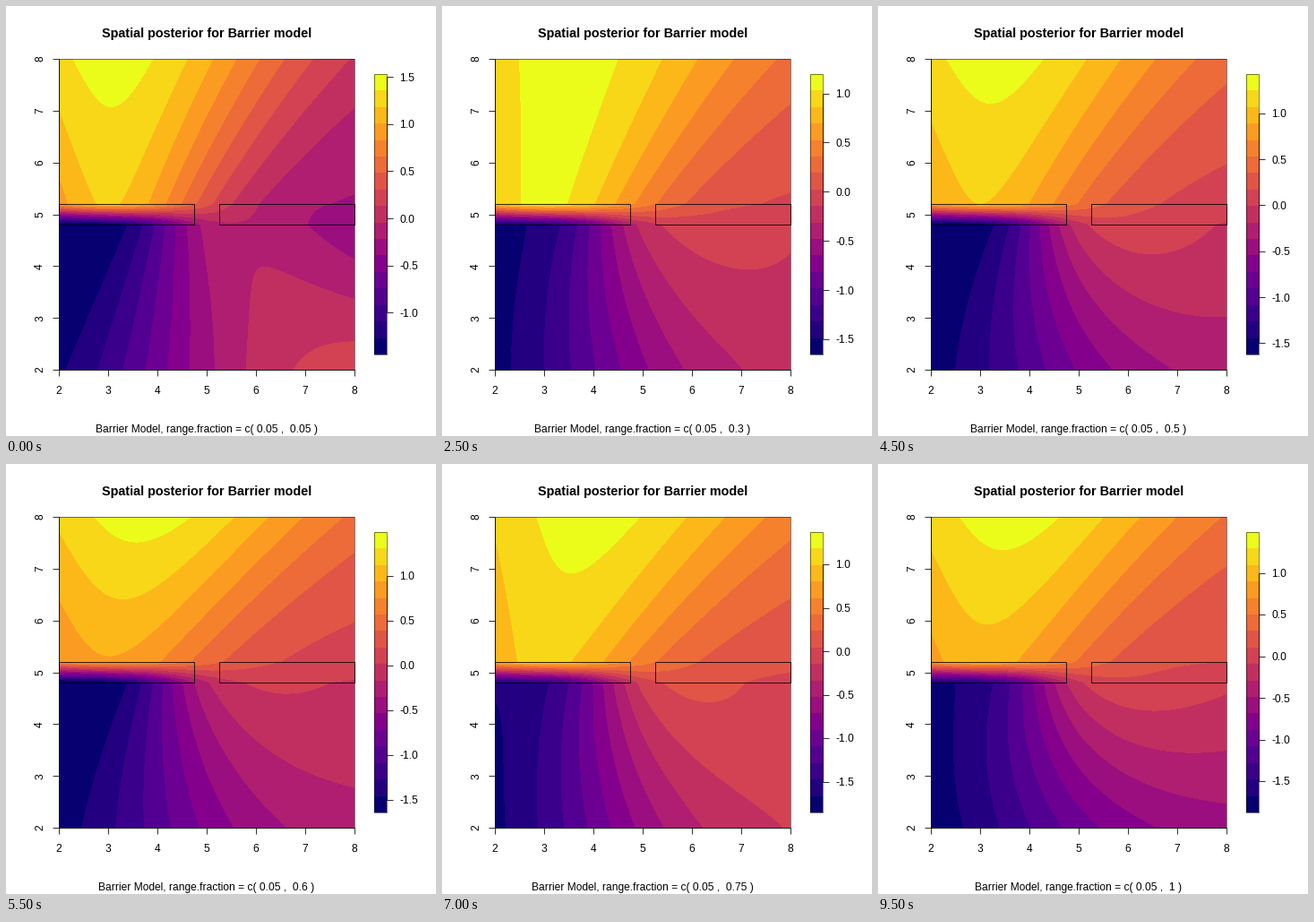
Write a matplotlib script that moves like this. It is 480x480 px and loops after 10 s.

```python
import numpy as np
import matplotlib.pyplot as plt
from matplotlib.animation import FuncAnimation
from matplotlib.patches import Rectangle

SIZE, DPI = 480, 72
FRAMES, INTERVAL = 20, 500
LEFT, RIGHT, TOP, BOTTOM = 59, 389, 59, 406
BAR_LEFT, BAR_RIGHT, BAR_TOP, BAR_BOTTOM = 411, 425, 76, 389
LEVELS = 17
PEAK = 16.45          # highest level, near the top of the colour bar
SOUTHWEST = -0.9

plt.rcParams["font.family"] = "Liberation Sans"

# Plasma as shown on a display with a lower gamma and purer purples
colors = plt.get_cmap("plasma")(np.linspace(0, 1, LEVELS))[:, :3] ** 1.22
colors[:, 1] -= 0.06 * colors[:, 2]
colors[:, 2] *= 0.96
colors = np.clip(colors, 0, 1)
colors[-1] = 0.925, 0.99, 0.105

# frame, bar row of zero, pixels per unit, then the shape of the field:
# ridge level, crest x, level far east, and lower west, east and south levels
KEYS = np.array([
    (0, 237.0, 105.2, 15.1, 3.1, 6.9, -0.6, 9.0, 10.0),
    (5, 207.3, 109.7, 16.3, 3.5, 9.9, 0.6, 9.9, 8.7),
    (9, 222.4, 102.7, 15.0, 3.3, 9.7, -0.5, 10.4, 7.7),
    (11, 224.5, 100.0, 13.9, 3.7, 9.7, -0.7, 9.6, 7.9),
    (14, 209.0, 97.0, 15.3, 3.9, 10.4, 1.0, 11.0, 9.4),
    (16, 213.5, 105.3, 14.6, 3.1, 10.1, 1.2, 9.9, 8.8),
    (19, 214.5, 93.0, 14.5, 3.6, 10.0, 0.7, 10.4, 6.8),
])


def state(frame):
    return [np.interp(frame, KEYS[:, 0], column) for column in KEYS.T[1:]]


def lerp(a, b, t):
    return a + (b - a) * t


width, height = RIGHT - LEFT, BOTTOM - TOP
xs = 2 + 6 * (np.arange(width) + 0.5) / width
ys = (8 - 6 * (np.arange(height) + 0.5) / height)[:, None]
north = np.clip((ys - 5.2) / 2.8, 0, 1)
south = np.clip((4.8 - ys) / 2.8, 0, 1)
through = np.clip((5.2 - ys) / 0.4, 0, 1)


def picture(ridge, crest, far, west, east, south_level):
    # Above: a ridge that widens northwards
    floor = far + 0.6 * north
    spread = 3.6 * lerp(0.6, 1, north)
    offset = (xs - lerp(3, crest, north)) / spread
    above = lerp(floor, lerp(ridge, PEAK, north), np.exp(-offset**2))
    # Below: a front that softens southwards
    plateau = lerp(east, far - 0.8, np.clip((xs - 5) / 3, 0, 1))
    high = lerp(plateau, south_level, south)
    low = lerp(west, SOUTHWEST, south)
    front = (xs - lerp(4.2, 4.0, south)) / lerp(0.5, 1.2, south)
    below = lerp(low, high, 1 / (1 + np.exp(-front)))
    level = np.floor(lerp(above, below, through))
    return colors[np.clip(level, 0, LEVELS - 1).astype(int)]


fig = plt.figure(figsize=(SIZE / DPI, SIZE / DPI), dpi=DPI, facecolor="white")
ax = fig.add_axes([0, 0, 1, 1])
ax.axis("off")


def line(x, y):
    return ax.plot(x, y, color="black", lw=0.8, solid_capstyle="butt")[0]


def box(x0, y0, x1, y1, lw=0.8):
    ax.add_patch(Rectangle((x0, y0), x1 - x0, y1 - y0,
                           fill=False, ec="black", lw=lw))


def label(x, y, text, **style):
    return ax.text(x, y, text, **{"size": 12, "ha": "center", **style})


def raster(pixels, *extent):
    return ax.imshow(pixels, extent=extent, interpolation="nearest",
                     aspect="auto")


image = raster(picture(*state(0)[2:]), LEFT, RIGHT, BOTTOM, TOP)
raster(colors[::-1, None], BAR_LEFT, BAR_RIGHT, BAR_BOTTOM, BAR_TOP)
ax.set(xlim=(0, SIZE), ylim=(SIZE, 0))

box(LEFT, TOP, RIGHT, BOTTOM, lw=0.5)
box(BAR_LEFT, BAR_TOP, BAR_RIGHT, BAR_BOTTOM, lw=0.5)
box(LEFT, 221, 210, 244)
box(238, 221, RIGHT, 244)
line([LEFT, LEFT], [TOP, BOTTOM])
line([LEFT, RIGHT], [BOTTOM, BOTTOM])

for value in range(2, 9):
    x = LEFT + (value - 2) * width / 6
    y = BOTTOM - (value - 2) * height / 6
    line([x, x], [BOTTOM, BOTTOM + 7])
    line([LEFT - 7, LEFT], [y, y])
    label(x, 433, str(value))
    label(38, y, str(value), rotation=90, va="center")

label(224, 35, "Spatial posterior for Barrier model", size=14.4, weight="bold")
caption = label(224, 476, "")
bar_axis = line([BAR_RIGHT, BAR_RIGHT], [BAR_TOP, BAR_BOTTOM])
ticks = [(v, line([BAR_RIGHT, BAR_RIGHT + 7], [0, 0]),
          label(439, 0, f"{v:.1f}", ha="left"))
         for v in np.arange(-2, 2.1, 0.5)]


def update(frame):
    zero, scale, *shape = state(frame)
    image.set_data(picture(*shape))
    caption.set_text("Barrier Model, range.fraction = "
                     f"c( 0.05 ,  {(frame + 1) * 0.05:g} )")
    shown = []
    for value, mark, text in ticks:
        y = zero - value * scale
        visible = BAR_TOP <= y <= BAR_BOTTOM
        mark.set_visible(visible)
        text.set_visible(visible)
        mark.set_ydata([y, y])
        text.set_y(y + 4.5)
        if visible:
            shown.append(y)
    bar_axis.set_ydata([min(shown), max(shown)])
    return []


anim = FuncAnimation(fig, update, frames=FRAMES, interval=INTERVAL,
                     init_func=lambda: update(0), repeat=True, repeat_delay=0)
plt.show()
```
